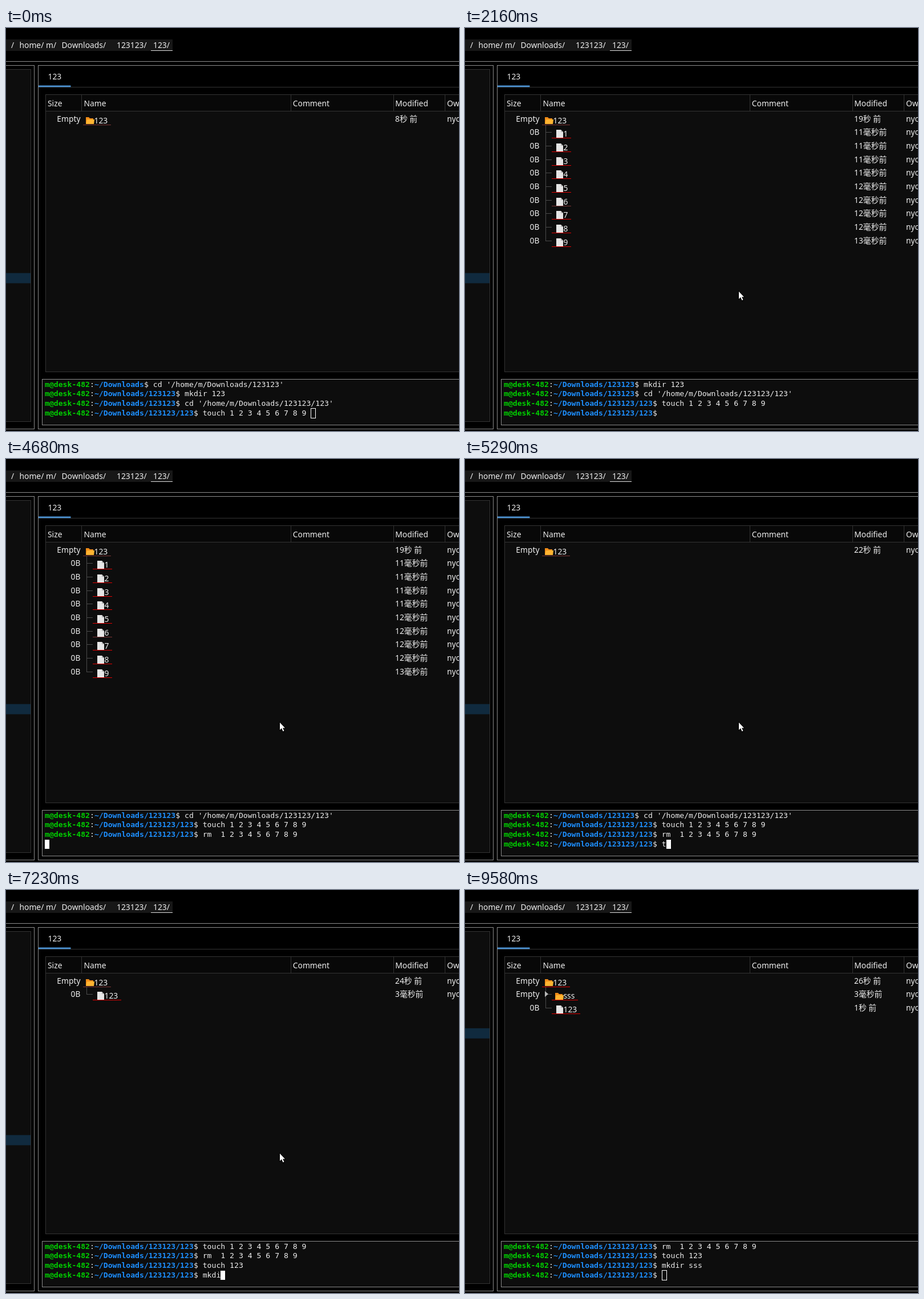
Write an HTML page with a canvas that moves like this. It is 794 px wide and 705 px high and loops after 9660 ms.

```html
<!DOCTYPE html>
<html lang="zh">
<head>
<meta charset="utf-8">
<style>
html, body { margin: 0; width: 100%; height: 100%; overflow: hidden; background: #000; }
canvas { display: block; }
</style>
</head>
<body>
<canvas id="stage" width="794" height="705"></canvas>
<script>
const ctx = document.getElementById('stage').getContext('2d');
const LOOP = 9660;
const UI = '13.83px "Noto Sans", "Noto Sans CJK SC", "Noto Sans CJK JP", sans-serif';
const MONO = '13.13px "DejaVu Sans Mono", monospace';
const CELL = 7.906, TERM_X = 68, TERM_Y = 627.6, TERM_STEP = 16.8;
const ROW_STEP = 23.7;
const FG = '#eeeeee', PANEL = '#0d0d0d', EDGE = '#333333', FRAME = '#8c8c8c';
const HOST = 'm@desk-482', OWNER = 'nyoro';

const HOME = '~/Downloads', SUB = HOME + '/123123', DEEP = SUB + '/123';
const DIGITS = '1 2 3 4 5 6 7 8 9 ';
const HISTORY = [
  [HOME, "cd '/home/m/Downloads/123123'"],
  [SUB, 'mkdir 123'],
  [SUB, "cd '/home/m/Downloads/123123/123'"],
  [DEEP, 'touch ' + DIGITS],
  [DEEP, 'rm  ' + DIGITS],
  [DEEP, 'touch 123'],
  [DEEP, 'mkdir sss']
];

const file = (name, age) => ({ name, age, size: '0B' });
const nine = [...'123456789'].map((n, i) => file(n, (i < 4 ? 11 : i < 8 ? 12 : 13) + '毫秒前'));
const folder = { name: 'sss', age: '3毫秒前', size: 'Empty', dir: true };

// Each event overrides part of the state from its time on.
const events = [[0, {
  done: 3, input: 'touch ' + DIGITS, col: 24, cursor: 'hollow', prompt: true,
  age: '8秒 前', rows: [], hover: 428.7
}]];
const at = (time, change) => events.push([time, change]);
const type = (start, end, before, text) => [...text].forEach((_, i) => {
  const input = before + text.slice(0, i + 1);
  at(start + (end - start) * i / (text.length - 1), { input, col: input.length });
});
const enter = (time, done) => at(time, { done, input: '', col: 0, prompt: true, cursor: 'solid' });

at(590, { cursor: 'solid' });
at(1100, { cursor: 'off' });
at(1610, { cursor: 'solid' });
enter(1650, 4);
at(1700, { age: '19秒 前', rows: nine });
at(2160, { cursor: 'off' });
at(2360, { cursor: 'solid', input: 'touch ' + DIGITS, col: 24 });
at(2660, { col: 0 });
for (let i = 1; i <= 5; i++) at(2850 + i * 136, { input: ('touch ' + DIGITS).slice(i) });
['r', 'rm', 'rm '].forEach((s, i) => at(3910 + i * 135, { input: s + ' ' + DIGITS, col: s.length }));
at(4340, { col: 22 });
at(4680, { done: 5, input: '', col: 0, prompt: false });
at(4830, { prompt: true, age: '22秒 前', rows: [] });
type(5240, 5760, '', 'touch ');
type(6100, 6210, 'touch ', '123');
enter(6460, 6);
at(6500, { age: '24秒 前', rows: [file('123', '3毫秒前')] });
type(6790, 7430, '', 'mkdir ');
type(7760, 7990, 'mkdir ', 'sss');
at(8290, { age: '26秒 前', rows: [folder, file('123', '1秒 前')] });
enter(8330, 7);
at(8840, { cursor: 'off', hover: 241.9 });
at(9320, { cursor: 'solid' });
at(9580, { cursor: 'hollow' });

function stateAt(t) {
  return Object.assign({}, ...events.filter(e => e[0] <= t).map(e => e[1]));
}

function rect(x, y, w, h, color) {
  ctx.fillStyle = color;
  ctx.fillRect(x, y, w, h);
}
function box(x, y, w, h, edge, fill) {
  rect(x, y, w, h, edge);
  rect(x + 1, y + 1, w - 2, h - 2, fill);
}
function text(s, x, y, color = FG, font = UI, align = 'left') {
  ctx.font = font;
  ctx.fillStyle = color;
  ctx.textAlign = align;
  ctx.fillText(s, x, y);
}
function shape(points, color, x = 0, y = 0) {
  ctx.beginPath();
  points.forEach(p => ctx.lineTo(x + p[0], y + p[1]));
  ctx.closePath();
  ctx.fillStyle = color;
  ctx.fill();
}

function folderIcon(x, y) {
  shape([[0, 1], [5, 1], [7, 3], [13, 3], [13, 12], [0, 12]], '#f08c18', x, y);
  shape([[2, 5], [15, 5], [14, 13], [0, 13]], '#ffb432', x, y);
}
function fileIcon(x, y) {
  shape([[0, 0], [8, 0], [12, 4], [12, 15], [0, 15]], '#e6e6e6', x, y);
  shape([[8, 0], [12, 4], [8, 4]], '#b4b4b4', x, y);
}
function underline(x, end, y, color) {
  rect(x, Math.floor(y), end - x, 1, color);
}

function drawFrame(s) {
  rect(0, 0, 794, 705, '#000');
  rect(0, 20, 292, 20, '#171717');
  [['/', 9], ['home/', 23.5], ['m/', 70], ['Downloads/', 97.5], ['123123/', 194], ['123/', 258]]
    .forEach(([label, x]) => text(label, x, 35));
  rect(254, 39, 38, 1, '#dddddd');
  rect(0, 58, 794, 1, FRAME);

  box(-2, 65, 52, 637, FRAME, '#000');
  box(-2, 72, 46, 617, EDGE, PANEL);
  rect(0, s.hover, 43, 17.8, '#102a3e');

  box(56, 65, 741, 637, FRAME, '#000');
  text('123', 73.5, 90);
  rect(57, 103, 737, 1, EDGE);
  rect(57, 100.5, 56.5, 2.8, '#4a90d0');

  box(69, 116, 730, 486, EDGE, PANEL);
  rect(70, 117, 724, 28, '#080808');
  rect(69, 145, 725, 1, EDGE);
  [132, 499, 679, 769].forEach(x => rect(x, 116, 1, 30, EDGE));
  [['Size', 73], ['Name', 136.5], ['Comment', 502.8], ['Modified', 682.3], ['Owner', 773]]
    .forEach(([label, x]) => text(label, x, 137));
}

function drawCells(size, age, y) {
  text(size, 130.5, y, FG, UI, 'right');
  text(age, 682, y);
  text(OWNER, 773, y);
}

function drawList(s) {
  drawCells('Empty', s.age, 164);
  folderIcon(140, 155);
  text('123', 154.5, 167);
  underline(135, 184, 169, s.rows.length === 2 ? '#e00000' : '#7c3434');

  const count = s.rows.length;
  if (count) rect(141, 170, 1, 13 + (count - 1) * ROW_STEP, '#4a4a4a');
  s.rows.forEach((row, i) => {
    const y = Math.floor((i + 1) * ROW_STEP), mid = 159 + y;
    drawCells(row.size, row.age, 164 + y);
    rect(141, mid, 11, 1, '#4a4a4a');
    if (row.dir) {
      shape([[140, mid - 5], [146, mid], [140, mid + 5]], '#b8b8b8');
      folderIcon(158, mid - 3);
    } else {
      fileIcon(160, mid - 4);
    }
    text(row.name, 172.5, 167 + y);
    const end = Math.round(178 + ctx.measureText(row.name).width);
    underline(152, end, 169 + y, i === 5 ? '#7c3434' : '#e00000');
  });
}

function drawPrompt(path, y) {
  const bold = 'bold ' + MONO;
  let x = TERM_X;
  [[HOST, '#00d000', bold], [':', FG, MONO], [path, '#1e90ff', bold], ['$', FG, MONO]]
    .forEach(([part, color, font]) => {
      text(part, x, y, color, font);
      x += part.length * CELL;
    });
  return x + CELL;
}

function drawTerminal(s) {
  box(63, 614, 740, 81, FRAME, PANEL);
  HISTORY.slice(s.done - 3, s.done).forEach(([path, command], i) => {
    const y = TERM_Y + i * TERM_STEP;
    text(command, drawPrompt(path, y), y, FG, MONO);
  });
  const y = TERM_Y + 3 * TERM_STEP;
  const x = s.prompt ? drawPrompt(DEEP, y) : TERM_X;
  text(s.input, x, y, FG, MONO);

  const cx = Math.round(x + s.col * CELL);
  if (s.cursor === 'solid') {
    rect(cx, 666, 8, 16, '#ffffff');
    text(s.input.charAt(s.col), x + s.col * CELL, y, '#000', MONO);
  } else if (s.cursor === 'hollow') {
    ctx.strokeStyle = '#ffffff';
    ctx.lineWidth = 1;
    ctx.strokeRect(cx + 0.5, 665.5, 8, 17);
  }
}

const EXIT = [[562, 415], [530, 290], [400, 203], [220, 212], [24, 250]];

function pointerAt(t) {
  if (t < 190 || t >= 8880) return null;
  if (t >= 8680) return EXIT[Math.floor((t - 8680) / 40)];
  const step = Math.min(1, Math.floor((t - 190) / 45.5) / 19);
  const ease = 1 - (1 - step) ** 3;
  return [273 + 207 * ease, 530 - 69 * ease];
}

function drawPointer(pos) {
  if (!pos) return;
  const [x, y] = pos.map(Math.round);
  shape([[-1, -2], [-1, 15], [3, 12], [5, 17], [9, 16], [6, 11], [11, 11]], '#000', x, y);
  shape([[0, 0], [0, 13], [3, 10], [5.5, 15.5], [7.5, 14.5], [5, 9.5], [9, 9.5]], '#fff', x, y);
}

function render(now) {
  const t = now % LOOP, s = stateAt(t);
  drawFrame(s);
  drawList(s);
  drawTerminal(s);
  drawPointer(pointerAt(t));
}

const start = performance.now();
function tick() {
  render(performance.now() - start);
  requestAnimationFrame(tick);
}
tick();
</script>
</body>
</html>
```
